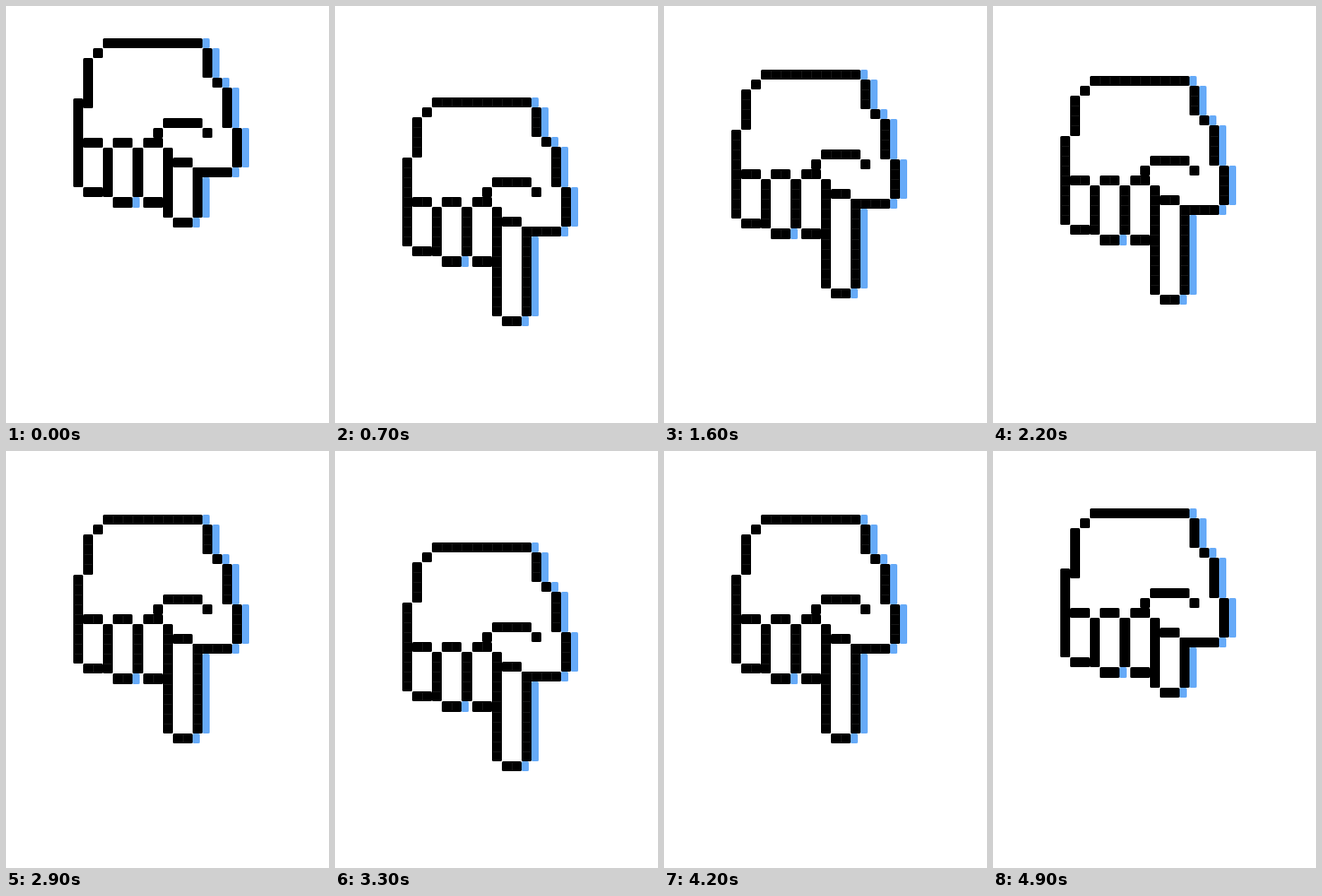
Recreate the animation shown at these times as an HTML page with a canvas. Size 360 px wide and 465 px high, loop 5000 ms.

```html
<!DOCTYPE html>
<html lang="en">
<head>
<meta charset="utf-8">
<title>Tapping hand</title>
<style>
  html, body { margin: 0; width: 100%; height: 100%; overflow: hidden; background: #fff; }
  canvas { display: block; }
</style>
</head>
<body>
<canvas id="stage" width="360" height="465"></canvas>
<script>
const ctx = document.getElementById('stage').getContext('2d');
const CELL = 11.09, LEFT = 74.9, SHADE = 8;
const INK = '#000', SEAM = '#151515', BLUE = '#66aaf8';
const LOOP = 5000, STEP = 100, DOWN = 6, UP = 7, MIDDLE = 71;

const colX = c => Math.round(LEFT + c * CELL);

function block(x, y, w, h, color) {
  ctx.fillStyle = color;
  ctx.beginPath();
  ctx.roundRect(x, y, w, h, 1.5);
  ctx.fill();
}

// Vertical position: cosine ease down, slightly slower ease back up.
function handTop(k) {
  const turn = k < DOWN ? k / DOWN : 1 + (k - DOWN) / UP;
  return MIDDLE - 35 * Math.cos(Math.PI * turn);
}

function drawHand(y, pointing) {
  const top = pointing ? Math.floor(y) : Math.ceil(y);
  const tip = pointing ? 22 : 18;
  const rowY = r => top + Math.round(r * CELL);

  function ink(c, r, w, h) {
    const x = colX(c), y = rowY(r);
    block(x, y, colX(c + w) - x, rowY(r + h) - y, INK);
    if (!pointing) return;
    ctx.fillStyle = SEAM;
    for (let i = 1; i < w; i++) ctx.fillRect(colX(c + i), y + 1, 1, CELL - 2);
    for (let i = 1; i < h; i++) ctx.fillRect(x + 1, rowY(r + i), CELL - 2, 1);
  }

  function shade(c, r, h) {
    const y = rowY(r);
    block(colX(c), y, SHADE, rowY(r + h) - y, BLUE);
  }

  // Shadow: column, row, height
  [[13, 0, 1], [14, 1, 3], [15, 4, 1], [16, 5, 4], [17, 9, 4], [16, 13, 1],
   [13, 14, tip - 14], [12, tip, 1], [6, 16, 1]].forEach(s => shade(...s));

  // Back of the hand
  ink(3, 0, 10, 1);
  ink(2, 1, 1, 1);
  ink(1, 2, 1, pointing ? 4 : 5);
  ink(0, 6, 1, 9);
  ink(13, 1, 1, 3);
  ink(14, 4, 1, 1);
  ink(15, 5, 1, 4);
  ink(16, 9, 1, 4);
  ink(12, 13, 4, 1);

  // Thumb
  ink(9, 8, 4, 1);
  ink(13, 9, 1, 1);
  ink(8, 9, 1, 1);
  ink(7, 10, 2, 1);

  // Folded fingers
  ink(1, 10, 2, 1);
  ink(4, 10, 2, 1);
  ink(3, 11, 1, 5);
  ink(6, 11, 1, 5);
  ink(1, 15, 2, 1);
  ink(4, 16, 2, 1);
  ink(7, 16, 2, 1);

  // Index finger
  ink(9, 11, 1, tip - 11);
  ink(10, 12, 2, 1);
  ink(12, 13, 1, tip - 13);
  ink(10, tip, 2, 1);
}

// Tap marks around the fingertip at the lowest point
function drawTap() {
  const mid = 197, size = 11;
  for (let i = 0; i < 4; i++) {
    const out = 43 + i * size, y = 372 + i * size;
    block(mid + out, y, size, size, INK);
    block(mid - out - size, y, size, size, INK);
  }
  block(mid - size / 2, 384, size, 4 * size, INK);
}

function draw(now) {
  const k = Math.floor((now % LOOP) / STEP) % (DOWN + UP);
  const y = handTop(k);
  ctx.fillStyle = '#fff';
  ctx.fillRect(0, 0, 360, 465);
  drawHand(y, y >= MIDDLE);
  if (k === DOWN) drawTap();
  requestAnimationFrame(draw);
}

draw(0);
</script>
</body>
</html>
```
